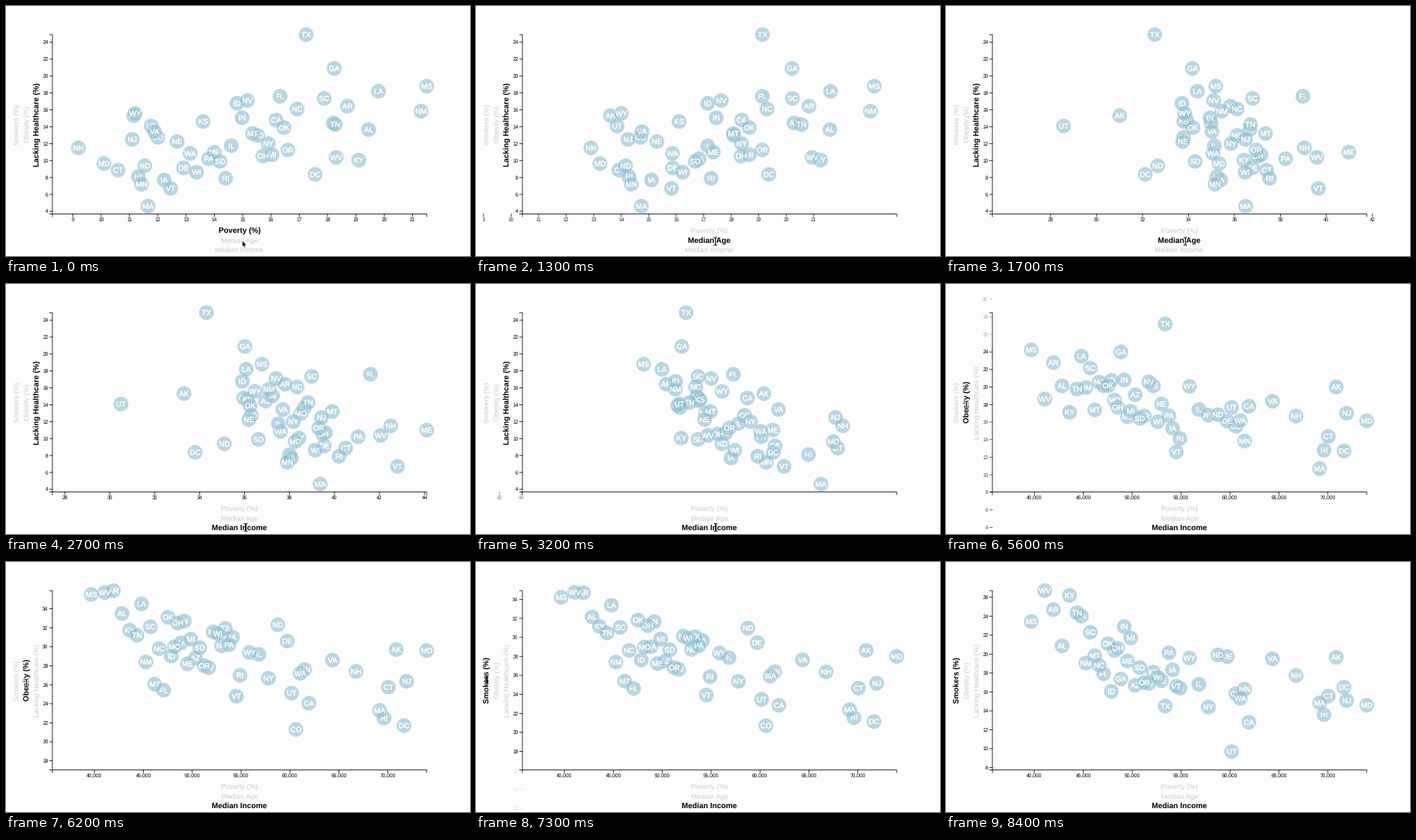
Recreate the animation shown at these times as a matplotlib script. Size 600x324 px, loop 8.8 s.

```python
import matplotlib.pyplot as plt
import numpy as np
from matplotlib.animation import FuncAnimation
from matplotlib.patches import Circle, Polygon, Rectangle
from matplotlib.patheffects import withStroke

W, H, DPI = 600, 324, 100
STEP, LOOP = 100, 8800
PX = 72 / DPI  # points per pixel
LEFT, RIGHT, TOP, BOTTOM = 60, 544, 37.1, 269.5
DURATION = 1000

# drawing order
STATES = ("AL AK AZ AR CA CO CT DE DC FL GA HI ID IL IN IA KS KY LA ME MD MA MI MN MS MO "
          "MT NE NV NH NJ NM NY NC ND OH OK OR PA RI SC SD TN TX UT VT VA WA WV WI WY").split()

# Each variable: tick spacing, the states from lowest to highest, and
# a curve through the values at a few ranks.
RANKS = [0, 1, 3, 5, 12, 19, 25, 31, 36, 41, 44, 46, 48, 49, 50]
X_VARS = {
    "poverty": (
        1,
        "NH MD CT NJ AK WY HI MN ND MA UT VA CO IA VT NE DE WA WI KS PA ME SD RI IL ID "
        "IN NV MT MO OH NY MI CA FL OK OR NC TX DC SC AZ GA TN WV AR KY AL LA NM MS",
        [9.2, 10.1, 11.1, 11.2, 12, 13.6, 14.8, 15.9, 16.6, 18.2, 18.3, 19.1, 19.8, 21.3, 21.5]),
    "age": (
        2,
        "UT AK DC TX ND ID CA GA LA KS NE OK CO WY SD MS AZ NM IN NV IL WA VA AR MN HI "
        "IA NY MD NC KY MO AL TN SC WI OR MA NJ OH DE MI MT RI CT PA FL WV NH VT ME",
        [30.5, 33.3, 34.3, 35.9, 36.3, 37.4, 38, 38.5, 39.3, 39.6, 40.5, 41.6, 42.5, 42.8, 44.1]),
    "income": (
        5000,
        "MS WV AR AL KY TN LA NM SC MT NC FL OK ID MO OH GA IN ME MI AZ SD OR NV KS WI "
        "NE TX PA IA VT RI WY IL NY ND DE UT CO WA MN CA VA NH MA HI CT AK DC NJ MD",
        [39680, 41060, 42830, 44360, 47530, 49850, 52620, 54890, 59720, 61930,
         69160, 70050, 71650, 71920, 73970]),
}
Y_VARS = {
    "healthcare": (
        2,
        "MA VT MN IA RI HI DC WI CT DE ND MD SD KY PA WV OH MI WA ME OR NH IL NY NE NJ "
        "CO MO MT VA AL OK UT TN AZ KS CA IN AK WY NM NC AR ID NV SC FL LA MS GA TX",
        [4.6, 6.7, 7.7, 8.1, 9.9, 11, 12.5, 13.9, 14.8, 16.1, 17.1, 17.6, 18.8, 20.9, 24.9]),
    "obesity": (
        2,
        "CO DC HI MA CA VT UT FL CT MT NJ NY RI WA NH MN NV OR ME NM VA AZ ID IL WY MD "
        "AK NC SD MO NE PA GA DE MI IA TN WI KS KY TX SC ND OH IN OK AL LA MS WV AR",
        [21.3, 21.7, 23.3, 24.8, 27, 28.4, 29.6, 30.2, 31.2, 32.1, 32.7, 33.5, 35.5, 35.7, 35.9]),
    "smokers": (
        2,
        "UT CA HI NY TX MD MA NJ WA CT CO ID MN RI DC VT AZ IL NV OR NE GA WI NH FL KS "
        "IA SD NC NM ME VA WY AK DE MT ND PA MO OH AL OK MI SC IN MS LA TN AR KY WV",
        [9.7, 12.8, 14.4, 14.6, 16.3, 17, 18.1, 19.5, 19.9, 21.1, 22.9, 24, 24.7, 26.2, 26.7]),
}

# caption and the baseline of each label
LABELS = {
    "poverty": ("Poverty (%)", 294.4),
    "age": ("Median Age", 307),
    "income": ("Median Income", 319.4),
    "healthcare": ("Lacking Healthcare (%)", 42.7),
    "obesity": ("Obesity (%)", 29.8),
    "smokers": ("Smokers (%)", 16.9),
}

# when each new variable is picked
X_CLICKS = [(976, "age"), (2694, "income")]
Y_CLICKS = [(5178, "obesity"), (7001, "smokers")]

# cursor stops: time, x, y
PATH = np.array([(200, 305.5, 304), (500, 309.5, 305), (2000, 309.5, 305), (2600, 310, 315.5),
                 (4000, 310, 315.5), (4100, 301, 309), (4900, 26.5, 157), (6200, 26.5, 157),
                 (6700, 14, 152.5)])
ARROW = np.array([(0, 0), (0, 8.4), (1.9, 6.7), (3.2, 9.6), (4.5, 9), (3.2, 6.2), (5.8, 6.1)])
HOOK = np.array([(2, -5), (.7, -4.8), (0, -4), (0, 4), (.7, 4.8), (2, 5)])
BEAM = np.vstack([HOOK, [(np.nan, np.nan)], HOOK * (-1, 1)])


def ticks_between(low, high, step):
    return range(int(np.ceil(low / step)) * step, int(high) + 1, step)


data, domain, ticks = {}, {}, {}
for group, margin in ((X_VARS, .9), (Y_VARS, .8)):
    for name, (step, order, curve) in group.items():
        order = order.split()
        data[name] = np.interp([order.index(s) for s in STATES], RANKS, curve)
        domain[name] = curve[0] * margin, curve[-1]
        ticks[name] = ticks_between(*domain[name], step)


def scale(name, v):
    low, high = domain[name]
    start, end = (LEFT, RIGHT) if name in X_VARS else (BOTTOM, TOP)
    return start + (end - start) * (v - low) / (high - low)


def ease(u):
    u = min(max(u, 0), 1)
    return 4 * u ** 3 if u < .5 else 1 - 4 * (1 - u) ** 3


def mix(a, b, k):
    return a + (b - a) * k


def phase(t, first, clicks):
    """Old variable, new variable and eased progress at time t."""
    old = new = first
    k = 1
    for start, name in clicks:
        if t >= start:
            old, new, k = new, name, ease((t - start) / DURATION)
    return old, new, k


plt.rcParams["font.family"] = "Liberation Sans"
plt.rcParams["text.hinting"] = "none"
fig = plt.figure(figsize=(W / DPI, H / DPI), dpi=DPI, facecolor="#fdfdfd")
ax = fig.add_axes([0, 0, 1, 1])
ax.set_xlim(0, W)
ax.set_ylim(H, 0)
ax.axis("off")
view = Rectangle((9, 0), 566, H, visible=False)
ax.add_patch(view)


def line(xs, ys, width=.85, color="#111111", z=1):
    return ax.plot(xs, ys, color=color, lw=width * PX, zorder=z, snap=False,
                   solid_joinstyle="miter")[0]


def text(s, size, z=1, **kw):
    return ax.text(0, 0, s, fontsize=size * PX, zorder=z, va="baseline", **kw)


line([LEFT, LEFT, RIGHT, RIGHT], [BOTTOM + 3.5, BOTTOM, BOTTOM, BOTTOM + 3.5])
line([LEFT - 3.5, LEFT, LEFT, LEFT - 3.5], [TOP, TOP, BOTTOM, BOTTOM])


def make_ticks(names, align):
    made = {}
    for v in sorted({v for name in names for v in ticks[name]}):
        made[v] = line([0, 0], [0, 0]), text(f"{v:,}", 6.7, ha=align)
        for artist in made[v]:
            artist.set_clip_path(view)
            artist.set_clip_on(True)
    return made


x_ticks = make_ticks(X_VARS, "center")
y_ticks = make_ticks(Y_VARS, "right")

labels = {}
for name, (caption, base) in LABELS.items():
    across = name in X_VARS
    label = text(caption, 9, ha="center", rotation=0 if across else 90,
                 rotation_mode="anchor")
    label.set_position(((LEFT + RIGHT) / 2 - .3, base) if across else (base, (TOP + BOTTOM) / 2))
    labels[name] = label

bubbles = []
for i, state in enumerate(STATES):
    dot = Circle((0, 0), 9.5, fc="#89bdd3", ec="#e3e3e3", lw=.6 * PX, alpha=.6, zorder=2 + i)
    ax.add_patch(dot)
    name = text(state, 9.7, 2.5 + i, ha="center", color="white",
                path_effects=[withStroke(linewidth=.3 * PX, foreground="white")])
    bubbles.append((dot, name))

arrow = Polygon(ARROW, fc="black", ec="white", lw=.6 * PX, zorder=90)
ax.add_patch(arrow)
beams = [line([], [], 1.9, "white", 90), line([], [], .9, "black", 91)]


def move_ticks(made, old, new, k, across):
    for v, (mark, caption) in made.items():
        p = mix(scale(old, v), scale(new, v), k)
        alpha = mix(v in ticks[old], v in ticks[new], k)
        shown = alpha > .01 and -20 < p < W + 20
        for artist in (mark, caption):
            artist.set_visible(shown)
            artist.set_alpha(alpha)
        if across:
            mark.set_data([p, p], [BOTTOM, BOTTOM + 3.5])
            caption.set_position((p, 279.4))
        else:
            mark.set_data([LEFT - 3.5, LEFT], [p, p])
            caption.set_position((54.6, p + 2.4))


def move_cursor(t):
    at = np.array([np.interp(t, PATH[:, 0], PATH[:, c]) for c in (1, 2)])
    pointing = t < 300 or 4200 <= t < 4800
    arrow.set_visible(pointing)
    arrow.set_xy(ARROW + at)
    for beam in beams:
        beam.set_visible(not pointing and t < 8400)
        beam.set_data(*(BEAM + at).T)


def draw(i):
    t = i * STEP
    x_old, x_new, kx = phase(t, "poverty", X_CLICKS)
    y_old, y_new, ky = phase(t, "healthcare", Y_CLICKS)
    move_ticks(x_ticks, x_old, x_new, kx, True)
    move_ticks(y_ticks, y_old, y_new, ky, False)

    for name, label in labels.items():
        active = name in (x_new, y_new)
        label.set_fontweight("bold" if active else "normal")
        label.set_fontsize((9.9 if active else 9.1) * PX)
        label.set_color("black" if active else "#cccccc")

    xs = mix(scale(x_old, data[x_old]), scale(x_new, data[x_new]), kx)
    ys = mix(scale(y_old, data[y_old]), scale(y_new, data[y_new]), ky)
    for (dot, caption), x, y in zip(bubbles, xs, ys):
        dot.center = x, y
        caption.set_position((x, y + 3.4))
    move_cursor(t)
    return []


anim = FuncAnimation(fig, draw, frames=LOOP // STEP, init_func=lambda: draw(0),
                     interval=STEP, repeat=True, repeat_delay=0, blit=False)
plt.show()
```
